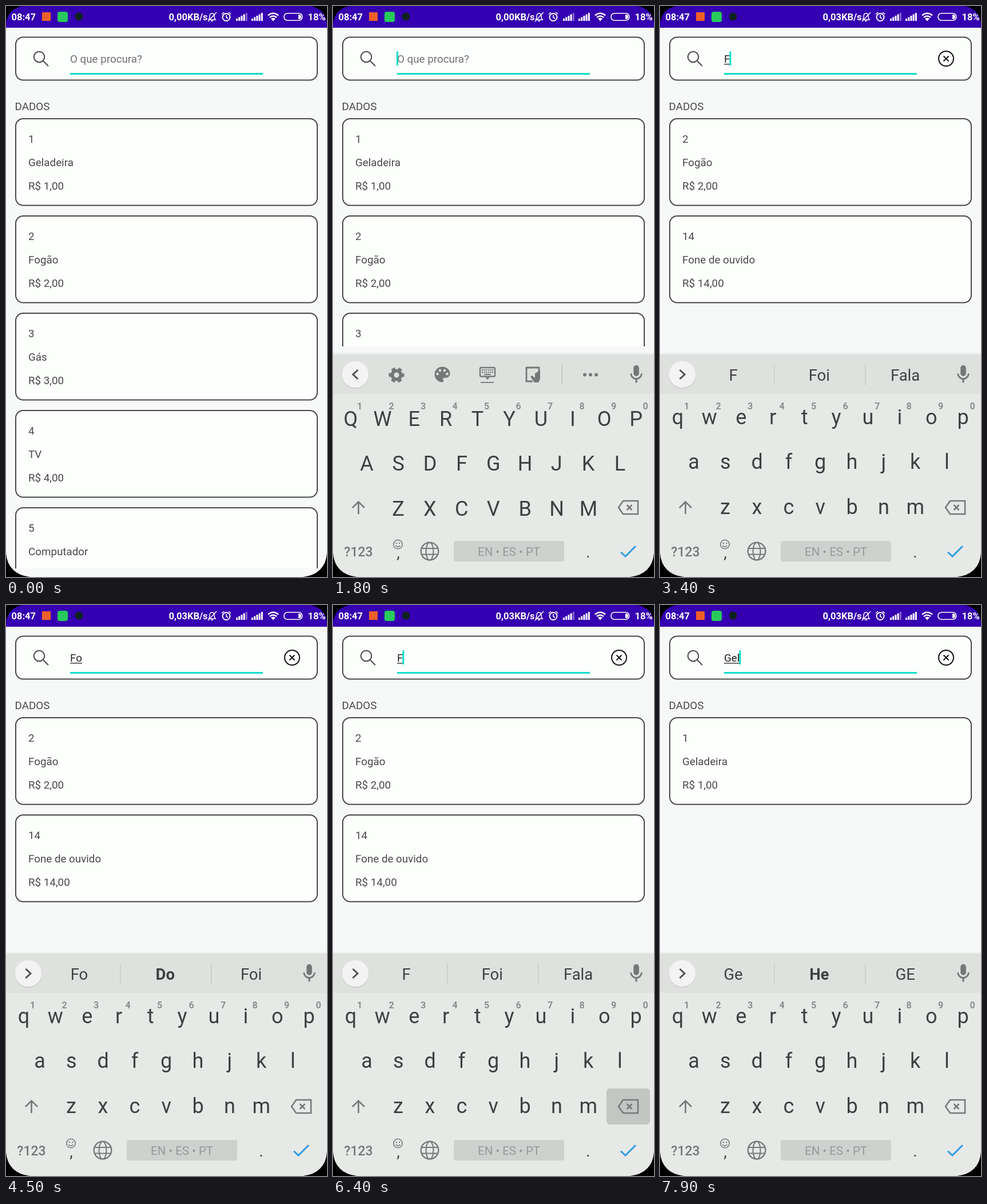
Recreate the animation shown at these times as an HTML page. Size 561 by 998 pixels, loop 8 s.

```html
<!DOCTYPE html>
<html lang="pt">
<head>
<meta charset="utf-8">
<style>
html, body { margin: 0; width: 100%; height: 100%; overflow: hidden; background: #f7f8f8; }
svg { display: block; width: 100vw; height: 100vh; font: 18.8px Roboto, sans-serif; }
.mid { text-anchor: middle; }
.line { fill: none; stroke-width: 2; }
.card { fill: #fdfffd; stroke: #484848; stroke-width: 2; }
.status { font-size: 16.5px; font-weight: 600; fill: #fff; }
.key { font-size: 36px; fill: #3e4140; }
.hint { font-size: 16px; font-weight: 600; fill: #8c8e8d; }
.word { font-size: 27.5px; fill: #3e4140; }
</style>
</head>
<body>
<svg id="stage" viewBox="0 0 561 998"></svg>
<script>
const LOOP = 8000, TICK = 100;
const GREY = '#767877', TEAL = '#08dcc9';
const ITEMS = [[1, 'Geladeira'], [2, 'Fogão'], [3, 'Gás'], [4, 'TV'], [5, 'Computador'], [14, 'Fone de ouvido']];

// Step tables: [start time, value]
const TYPED = [[0, ''], [2400, 'F'], [3900, 'Fo'], [6300, 'F'], [6700, ''], [7200, 'G'], [7500, 'Ge'], [7800, 'Gel']];
const WORDS = [[0, ''], [2700, 'F Foi Fala'], [4000, 'Fo *Do Foi'], [6400, 'F Foi Fala'], [6800, ''], [7600, 'Ge *He GE']];
const SLIDE = [[0, 400], [1200, 310], [1300, 190], [1400, 85], [1500, 22], [1600, 0]];
const RIPPLE = [[0, 0], [1100, 0.6], [1200, 1], [1400, 0.6], [1500, 0.3], [1600, 0]];
const PRESS = [[0, 0], [6200, 1], [6500, 0], [6600, 1], [6800, 0]];
const BAR = [[0, 0], [1200, 1], [1700, 0.5], [1800, 0]];

const text = (x, y, s, attrs = '') => `<text x="${x}" y="${y}" ${attrs}>${s}</text>`;
const rect = (x, y, w, h, attrs = '') => `<rect x="${x}" y="${y}" width="${w}" height="${h}" ${attrs}/>`;
const circle = (x, y, r, attrs = '') => `<circle cx="${x}" cy="${y}" r="${r}" ${attrs}/>`;
const line = (d, color, attrs = '') => `<path class="line" d="${d}" stroke="${color}" ${attrs}/>`;
const times = (n, fn) => Array.from({ length: n }, (_, i) => fn(i)).join('');

function statusBar() {
  const bars = (x, dim) => times(5, i => {
    const h = 4 + i * 2.5;
    return rect(x + i * 4.2, 26 - h, 3, h, `fill="#fff" opacity="${i === 4 ? dim : 1}"`);
  });
  return rect(0, 0, 561, 38, 'fill="#3500b1"') + `<g class="status">` +
    text(9.5, 25, '08:47') + text(284.5, 25, '', 'id="speed"') + text(527.5, 25, '18%') + '</g>' +
    rect(63, 11, 15, 15, 'fill="#ee5f28"') + rect(90, 10, 18, 18, 'rx="4" fill="#27c95c"') +
    circle(127.5, 18.5, 7, 'fill="#10221f"') +
    line('M354 24h12c-2-2-2-4-2-6 0-3-1-5-4-5s-4 2-4 5 0 4-2 6M358 26h4M353 27L368 11', '#fff', 'style="stroke-width:1.5"') +
    circle(385, 19.5, 6.5, 'class="line" stroke="#fff"') +
    line('M385 15.5v4.5l3 2M377 14.500l4-3.500M393 14.500l-4-3.500', '#fff', 'style="stroke-width:1.6"') +
    bars(402, 0.4) + bars(429, 1) +
    line('M458 16.500q9-7.500 18 0M461 20q6-5 12 0', '#fff', 'style="stroke-width:2.4"') +
    '<path d="M463 22q4-3 8 0l-4 4.500z" fill="#fff"/>' +
    rect(485.800, 12.800, 32, 12.400, 'rx="6.200" class="line" stroke="#fff" style="stroke-width:1.6"') +
    '<path d="M511 15h1a4 4 0 0 1 0 8h-1z" fill="#fff"/>';
}

function searchBox() {
  return rect(17, 54.5, 527, 75, 'rx="13" class="card"') +
    circle(61, 92, 41, 'id="ripple" fill="#f4f5f4" clip-path="url(#box)"') +
    circle(58, 89, 9.300, 'class="line" stroke="#484848"') + line('M64.800 95.800L74 105', '#484848') +
    rect(112, 117, 337, 3, `fill="${TEAL}"`) +
    text(112, 99, 'O que procura?', 'id="prompt" fill="#6f7170"') +
    text(112, 99, '', 'id="typed" fill="#222"') +
    rect(112, 101, 0, 1.300, 'id="under" fill="#222"') +
    rect(0, 79.5, 3, 24.5, `id="caret" fill="${TEAL}"`) +
    `<g id="clear">${circle(500, 92, 13, 'class="line" stroke="#111"')}${line('M495.500 87.500l9 9M504.500 87.500l-9 9', '#111')}</g>` +
    text(15.5, 182, 'DADOS', 'fill="#484848"');
}

const card = ([id, name], i) => `<g transform="translate(0 ${i * 170})" fill="#484848">` +
  rect(17, 197, 527, 151.5, 'rx="13" class="card"') +
  text(39, 239, id) + text(39, 280, name) + text(39, 321, `R$ ${id},00`) + '</g>';

function toolIcons() {
  return `<g fill="${GREY}">` +
    circle(111, 645, 7.500, `class="line" stroke="${GREY}" style="stroke-width:6"`) +
    circle(111, 645, 11.500, `class="line" stroke="${GREY}" style="stroke-width:4" stroke-dasharray="6.500 5.543" stroke-dashoffset="3.25"`) +
    '<path transform="translate(173 626) scale(1.5)" d="M12 3a9 9 0 0 0 0 18c.83 0 1.500-.67 1.500-1.500 0-.4-.15-.74-.4-1-.23-.26-.38-.6-.38-1 0-.83.67-1.500 1.500-1.500H16c2.760 0 5-2.240 5-5 0-4.420-4-8-9-8z"/>' +
    [[182.5, 643], [187, 637], [195, 637], [199.5, 643]].map(([x, y]) => circle(x, y, 2.3, 'fill="#dfe1df"')).join('') +
    rect(257, 632, 26, 15.500, `rx="2" class="line" stroke="${GREY}" style="stroke-width:2.4"`) +
    times(12, i => rect(260 + i % 6 * 3.6, 635 + (i / 6 | 0) * 4, 2.2, 2.4)) + rect(264, 643, 12, 2) +
    '<path d="M266 649h8l-4 4z"/>' + rect(258, 657, 23, 1.800) +
    line('M349 656h-11v-24h22v12', GREY, 'style="stroke-width:2.8"') +
    '<path d="M345 648l3-2 5 4v-8l9-5v15l-3 6h-7z"/>' +
    rect(399.3, 627, 1.500, 34, 'fill="#c4c6c4"') +
    times(3, i => circle(440 + i * 10, 644.5, 3)) + '</g>';
}

function keyboard() {
  const row = (s, x, y, step) => [...s].map((c, i) =>
    text(x + i * step, y, c, `class="key mid" data-key="${c}"`)).join('');
  return '<rect y="606" width="561" height="4" fill="#eff0ef"/>' +
    rect(0, 609, 561, 400, 'fill="#e7e9e7"') + rect(0, 609, 561, 69, 'fill="#dfe1df"') +
    circle(39, 645.5, 23.5, 'fill="#cbcdcb"') + circle(39, 644, 23.2, 'fill="#f2f3f2"') +
    line('', '#505251', 'id="chevron" style="stroke-width:3"') +
    `<g id="tools">${toolIcons()}</g><g id="words"></g>` +
    `<path fill="${GREY}" transform="translate(510.800 624.600) scale(1.6)" d="M12 14a3 3 0 0 0 3-3V5a3 3 0 0 0-6 0v6a3 3 0 0 0 3 3zM17 11a5 5 0 0 1-10 0H5.300a6.700 6.700 0 0 0 5.700 6.700V21h2v-3.300a6.700 6.700 0 0 0 5.700-6.700z"/>` +
    row('qwertyuiop', 31, 731, 55.4) + row('asdfghjkl', 59, 809, 55.3) + row('zxcvbnm', 114, 888, 55.4) +
    times(10, i => text(46.5 + i * 55.5, 705, (i + 1) % 10, 'class="hint mid"')) +
    line('M44.500 888v-21M34 877l10.500-10.500L55 877', GREY, 'style="stroke-width:2.6"') +
    rect(478, 845, 76, 63, 'id="press" rx="6" fill="#c4c6c4"') +
    line('M507 865h26v23h-26l-8-11.500zM513.500 872l9 9M522.500 872l-9 9', GREY, 'style="stroke-width:2.5"') +
    text(44.5, 962, '?123', `class="mid" font-size="23" font-weight="500" fill="${GREY}"`) +
    circle(113.5, 941, 7.700, `class="line" stroke="${GREY}" style="stroke-width:1.6"`) +
    circle(110.8, 939, 1.2, `fill="${GREY}"`) + circle(116.2, 939, 1.2, `fill="${GREY}"`) +
    line('M109.500 943q4 4.500 8 0', GREY, 'style="stroke-width:1.5"') +
    text(114, 965, ',', 'class="mid" font-size="28" fill="#3e4140"') +
    circle(169, 953, 15.3, `class="line" stroke="${GREY}" style="stroke-width:2.3"`) +
    `<ellipse cx="169" cy="953" rx="6.500" ry="15.300" class="line" stroke="${GREY}"/>` +
    line('M155 948h28M155 958.500h28', GREY) +
    rect(211, 935, 193, 36, 'rx="4" fill="#cfd1cf"') +
    text(307.5, 961, 'EN • ES • PT', 'class="mid" font-size="20.400" fill="#979998"') +
    text(446, 964, '.', 'class="mid" font-size="28" fill="#3e4140"') +
    line('M503 954.500l8 7.500 18-18', '#2e9be6', 'style="stroke-width:3"');
}

const corners = '<path d="M0 0H30Q4 4 0 30zM561 0H531Q557 4 561 30zM0 998V956Q3 993 42 998zM561 998V956Q558 993 519 998z"/>';

const stage = document.getElementById('stage');
stage.innerHTML =
  `<defs><clipPath id="box">${rect(18, 55.5, 525, 73, 'rx="12"')}</clipPath>` +
  `<clipPath id="view">${rect(0, 190, 561, 793, 'id="crop"')}</clipPath></defs>` +
  rect(0, 0, 561, 998, 'fill="#f7f8f8"') + statusBar() + searchBox() +
  `<g clip-path="url(#view)"><g id="list"></g>${rect(539, 196, 6, 44.5, 'id="bar" fill="#777" opacity="0"')}</g>` +
  `<g id="keyboard">${keyboard()}</g>` + corners;

const $ = id => document.getElementById(id);
const keys = [...document.querySelectorAll('[data-key]')];
const stepAt = (table, t) => table.filter(([start]) => start <= t).pop();
const at = (table, t) => stepAt(table, t)[1];
const set = (id, attrs) => Object.entries(attrs).forEach(([k, v]) => $(id).setAttribute(k, v));
const show = (id, on) => set(id, { opacity: +on });

const suggestions = words => rect(199, 627, 1.5, 36, 'fill="#c9cbc9"') + rect(358, 627, 1.5, 36, 'fill="#c9cbc9"') +
  words.split(' ').map((w, i) => text(128 + i * 150.3, 655, w.replace('*', ''),
    `class="word mid" font-weight="${w[0] === '*' ? 700 : 400}"`)).join('');

function draw(t) {
  const [since, typed] = stepAt(TYPED, t);
  const words = at(WORDS, t);
  const open = t >= 1200;
  const blinkStart = Math.max(since, 1400);

  $('speed').textContent = t < 1900 ? '0,00KB/s' : '0,03KB/s';
  $('typed').textContent = typed;
  const width = typed ? $('typed').getComputedTextLength() : 0;
  set('under', { width });
  set('caret', { x: 111 + width - (typed ? 0.5 : 0) + (typed ? 0.5 : 0) });
  show('caret', t >= blinkStart && (t - blinkStart) % 1000 < 500);
  show('prompt', !typed);
  show('clear', typed);
  set('clear', { opacity: typed ? 1 : 0 });
  set('ripple', { opacity: at(RIPPLE, t), r: t < 1200 ? 28 : 41 });

  const found = ITEMS.filter(([, name]) => name.toLowerCase().includes(typed.toLowerCase()));
  $('list').innerHTML = found.map(card).join('');
  set('crop', { height: open ? 405 : 793 });
  set('bar', { opacity: 0.5 * at(BAR, t) });

  set('keyboard', { transform: `translate(0 ${at(SLIDE, t)})`, visibility: open ? 'visible' : 'hidden' });
  keys.forEach(k => {
    k.textContent = typed ? k.dataset.key : k.dataset.key.toUpperCase();
    k.setAttribute('dy', typed ? 0 : 2.5);
  });
  show('tools', !words);
  $('words').innerHTML = words ? suggestions(words) : '';
  set('chevron', { d: words ? 'M34.500 636l8.500 8-8.500 8' : 'M43.500 636l-8.500 8 8.500 8' });
  show('press', at(PRESS, t));
}

const begin = performance.now();
let last = -1;
function frame() {
  const t = Math.floor((performance.now() - begin) % LOOP / TICK) * TICK;
  if (t !== last) draw(last = t);
  requestAnimationFrame(frame);
}
frame();
</script>
</body>
</html>
```
